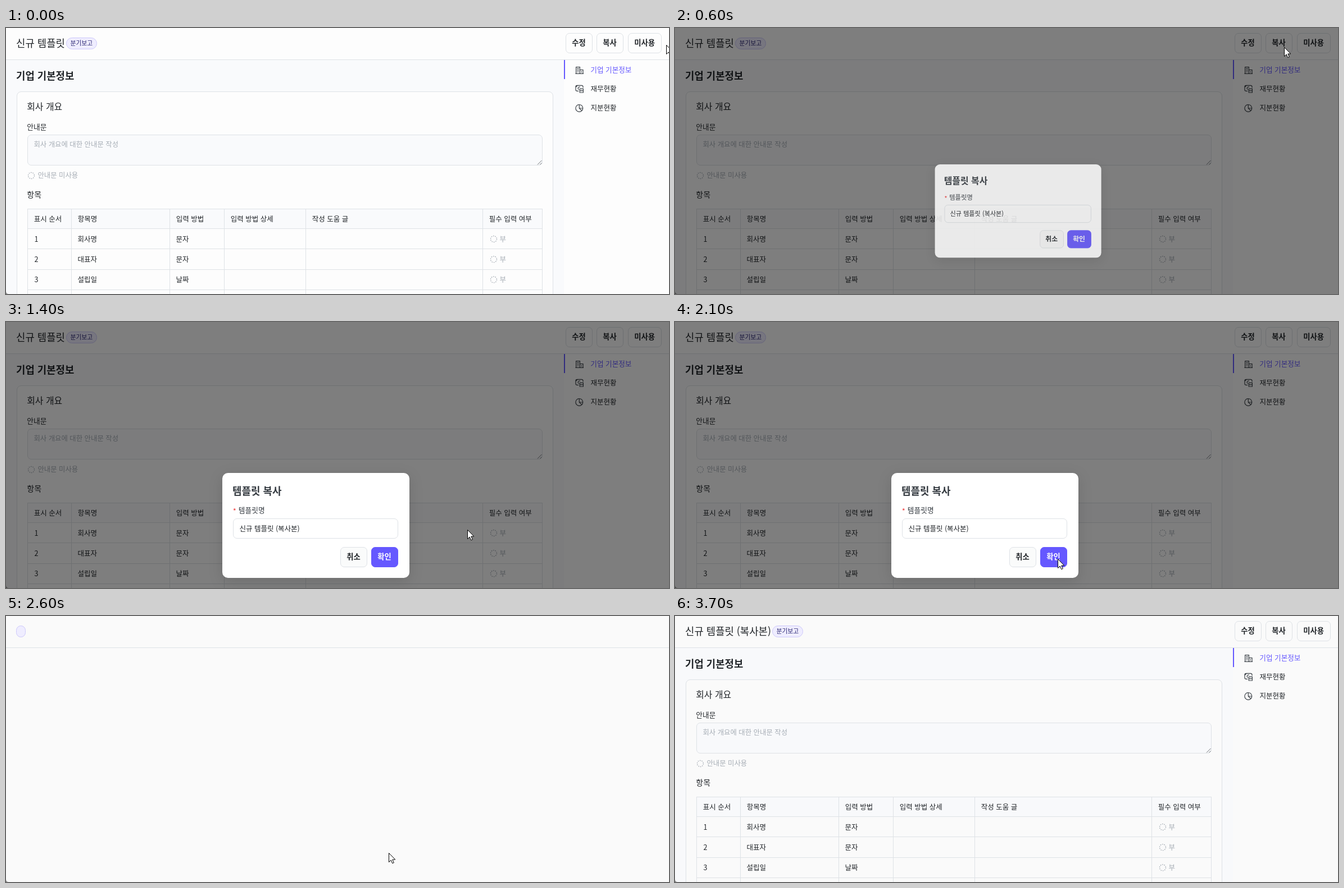
Animation, 1180 px wide and 474 px high, one loop 3800 ms. Source, as an HTML page:

```html
<!DOCTYPE html>
<html lang="ko">
<head>
<meta charset="utf-8">
<style>
  html, body { margin: 0; width: 100%; height: 100%; overflow: hidden; background: #fafafa; }
  svg { display: block; width: 1180px; height: 474px; }
  text { font-family: "Noto Sans CJK KR", "Noto Sans CJK", "Noto Sans CJK JP", sans-serif; white-space: pre; }
  #panel { filter: drop-shadow(0 6px 12px rgba(0,0,0,.12)); }
</style>
</head>
<body>
<svg id="stage" viewBox="0 0 1180 474"></svg>
<script>
const LOOP = 3800, STEP = 100;
const INK = '#212529', GREY = '#a6adb5', LINE = '#dee2e6', VIOLET = '#6558ff';

// Text is placed by its left edge and its vertical centre.
const text = (x, cy, str, size = 12.5, weight = 400, fill = INK) =>
  `<text x="${x - size * .05}" y="${cy + size * .37}" font-size="${size}" font-weight="${weight}" fill="${fill}">${str}</text>`;
const box = (x, y, w, h, r, fill, stroke = LINE, extra = '') =>
  `<rect x="${x + .5}" y="${y + .5}" width="${w - 1}" height="${h - 1}" rx="${r}" fill="${fill}" stroke="${stroke}" ${extra}/>`;
const path = (d, stroke = LINE, fill = 'none') => `<path d="${d}" stroke="${stroke}" fill="${fill}"/>`;
const button = (x, y, w, label, fill, stroke, color, id = '') =>
  box(x, y, w, 36, 6.5, fill, stroke, id) + text(x + 12, y + 17.5, label, 13.3, 700, color);
const dotted = (x, y) =>
  `<circle cx="${x}" cy="${y}" r="5.5" fill="none" stroke="${GREY}" stroke-width="1.3" stroke-dasharray="1.7 1.756"/>`;

function table() {
  const cols = [38, 116, 291, 388, 533, 848, 954], rows = [322, 357, 393, 430, 466];
  const heads = ['표시 순서', '항목명', '입력 방법', '입력 방법 상세', '작성 도움 글', '필수 입력 여부'];
  const items = [['회사명', '문자'], ['대표자', '문자'], ['설립일', '날짜']];
  let out = '<rect class="tint" x="38" y="322" width="917" height="36"/>';
  out += path(cols.map(x => `M${x + .5} 322V474`).join('') + rows.map(y => `M38 ${y + .5}H955`).join(''));
  heads.forEach((h, i) => out += text(cols[i] + 12.3, 340, h));
  items.forEach(([name, kind], i) => {
    const y = 376 + i * 36.2;
    out += text(51, y, i + 1, 12.5, 500) + text(128, y, name, 12.5, 500) + text(303, y, kind, 12.5, 500)
      + dotted(868, y) + text(879, y, '부', 12.5, 400, GREY);
  });
  return out;
}

const icons = `<g fill="none" stroke="#3d4349" stroke-width="1.2">
  <path d="M1014.6 81.4V69.6H1021.4V81.4M1021.4 74.6H1027V81.4M1013.4 81.4H1028M1016.3 72.4H1019.7M1016.3 75.2H1019.7M1016.3 78H1019.7M1024.2 77V79.5"/>
  <path d="M1019 112.4H1016.5Q1014 112.4 1014 110V104.5Q1014 102.4 1016.3 102.4H1024.5Q1027 102.4 1027 104.8V106.5M1014 105.5L1017 102.6M1022 105.2A2.6 2.6 0 1 0 1019.5 109.8M1021.2 108.3H1027.4V115H1021.2ZM1021.2 111.6H1027.4"/>
  <path d="M1020.3 136.5A6.4 6.4 0 1 0 1026.7 143H1020.3ZM1020.3 136.5A6.4 6.4 0 0 1 1026.7 143M1020.3 143L1024.8 147.4"/>
</g>`;

const content = `
  <rect class="tint" y="57" width="993" height="417"/>
  ${text(19, 85, '기업 기본정보', 17.8, 700)}
  ${box(19, 113, 955, 400, 7.5, 'none', LINE, 'class="paper"')}
  ${text(38, 140, '회사 개요', 15.9, 500)}
  ${text(38, 176, '안내문', 12.7, 500)}
  ${box(38, 190, 917, 55, 6.5, 'none', LINE, 'class="tint"')}
  ${text(50, 207.5, '회사 개요에 대한 안내문 작성', 12.4, 400, GREY)}
  ${path('M946 243.5L953.5 236M950.5 243.5L953.5 240.5', '#6f7478')}
  ${dotted(45, 263)}${text(57, 262, '안내문 미사용', 12.4, 400, GREY)}
  ${text(38, 296.5, '항목', 14, 500)}
  ${table()}
  <rect x="993" y="57" width="2" height="34" fill="${VIOLET}"/>
  ${icons}
  ${text(1041, 74, '기업 기본정보', 12.6, 400, VIOLET)}
  ${text(1041, 108.5, '재무현황')}
  ${text(1041, 142.5, '지분현황')}
  <g id="title"></g>
  ${button(996, 9, 48, '수정', 'none', LINE, INK)}
  ${button(1051, 9, 48, '복사', 'none', LINE, INK, 'id="copy"')}
  ${button(1107, 9, 60, '미사용', 'none', LINE, INK)}`;

const dialog = `
  <rect id="panel" x="385" y="269" width="333" height="187" rx="10" fill="#fff"/>
  ${text(404, 301.5, '템플릿 복사', 17.9, 700, '#343a40')}
  ${text(404.5, 337, '*', 13, 500, '#f03e3e')}
  ${text(414.5, 335.5, '템플릿명', 12.7, 400, '#343a40')}
  ${box(404, 350, 294, 36, 6.5, '#fff')}
  ${text(416, 368, '신규 템플릿 (복사본)')}
  ${button(595, 401, 48, '취소', '#fafbfb', LINE, INK)}
  ${button(650, 401, 48, '확인', VIOLET, VIOLET, '#fff')}`;

stage.innerHTML = `
  <rect class="paper" width="1180" height="474"/>
  <g id="content">${content}</g>
  ${path('M0 56.5H1180')}
  <g id="badge"></g>
  ${path('M0 469Q0 474 5 474H0Z', 'none', '#868686')}
  <g id="modal"><rect width="1180" height="474" fill="#000" opacity=".5"/><g id="dialog">${dialog}</g></g>
  <g id="cursor">${path('M.5 .5V16.6L4.2 13L6.7 18.7L9.3 17.6L6.8 12H11.8Z', '#000', '#fff')}</g>`;

const $ = id => document.getElementById(id);

// Pointer path: time, x, y
const track = [
  [0, 1175, 30], [100, 1142, 33], [200, 1112, 34], [300, 1094, 34], [400, 1086, 34], [500, 1084, 34],
  [700, 1084, 34], [900, 830, 185], [1000, 643, 293], [1200, 556, 339], [1300, 583, 436],
  [1400, 821, 370], [1500, 752, 395], [1600, 698, 416], [1700, 681, 422], [3000, 681, 422],
  [3100, 735, 385], [3200, 880, 270], [3300, 1050, 145], [3400, 1163, 70]
];

function pointer(t) {
  const i = Math.max(1, track.findIndex(k => k[0] >= t));
  const [a, b] = [track[i - 1], track[i]], p = (t - a[0]) / (b[0] - a[0]);
  return [a[1] + (b[1] - a[1]) * p, a[2] + (b[2] - a[2]) * p];
}

function draw(t) {
  const open = t >= 600 && t < 2600, copied = t >= 2600, empty = t >= 2600 && t < 2700;
  const [paper, tint] = copied ? ['#fafafa', '#f8f9fb'] : ['#fdfdfd', '#f9fafc'];
  document.querySelectorAll('.paper').forEach(e => e.style.fill = paper);
  document.querySelectorAll('.tint').forEach(e => e.style.fill = tint);
  $('content').style.display = empty ? 'none' : '';
  $('title').innerHTML = text(19, 27.5, copied ? '신규 템플릿 (복사본)' : '신규 템플릿', 17.8, 500);

  const bx = empty ? 18 : copied ? 173 : 107;
  $('badge').innerHTML = box(bx, 17, empty ? 17 : 55, 21, empty ? 8 : 10, '#efedff', '#cdc8fa')
    + (empty ? '' : text(bx + 8, 27.5, '분기보고', 10.8, 400, '#2b2773'));
  $('copy').style.fill = t >= 300 && t < 600 ? '#f1f3f5' : 'none';

  // The dialog zooms out of the point that was clicked.
  const [scale, alpha] = t < 700 ? [.889, .84] : t < 2300 ? [1, 1] : [.985, .96];
  $('modal').style.display = open ? '' : 'none';
  $('dialog').setAttribute('transform', `translate(1084 35) scale(${scale}) translate(-1084 -35)`);
  $('dialog').setAttribute('opacity', alpha);

  const gone = t >= 3500;
  $('cursor').style.display = gone ? 'none' : '';
  if (!gone) $('cursor').setAttribute('transform', `translate(${pointer(t).map(Math.round)})`);
}

let last = -1;
const start = performance.now();
function tick() {
  const t = Math.floor((performance.now() - start) % LOOP / STEP) * STEP;
  if (t !== last) draw(last = t);
  requestAnimationFrame(tick);
}
tick();
</script>
</body>
</html>
```
